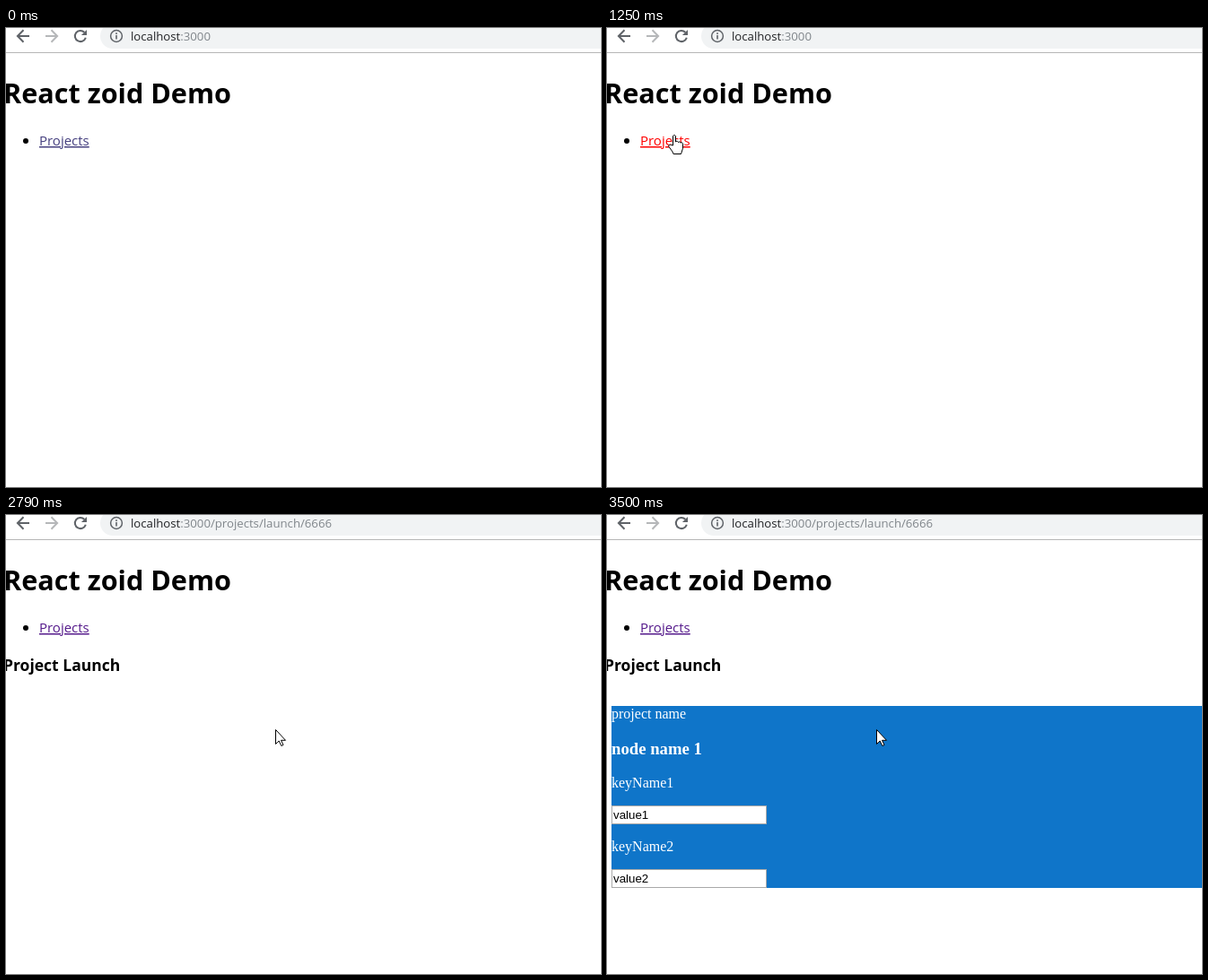
An HTML page that plays this animation: 663x512 px, repeating every 4220 ms.

```html
<!DOCTYPE html>
<html lang="en">
<head>
<meta charset="utf-8">
<title>React zoid Demo</title>
<style>
  html, body { margin: 0; width: 100%; height: 100%; overflow: hidden; background: #fff; }
  svg { display: block; width: 663px; height: 512px; font: 15px "Open Sans", "Noto Sans", sans-serif; }
  .link { fill: #551a8b; text-decoration: underline 1px; text-underline-offset: 1px; }
  .link.idle { fill: #46407f; }
  .link.active { fill: #f00; }
  .bold { font-weight: 700; }
  .url { font-size: 13.2px; fill: #202124; }
  #path { fill: #80868b; }
  .icon { fill: none; stroke: #5f6368; stroke-width: 2; }
  .serif { font: 16px "Liberation Serif", serif; fill: #fff; }
  .field rect { fill: #fff; stroke: #a9a9a9; }
  .field text { font: 13.333px "Liberation Sans", sans-serif; }
  .cursor { fill: #fff; stroke: #000; stroke-linejoin: round; }
</style>
</head>
<body>
<svg viewBox="0 0 663 512">
  <g id="toolbar">
    <rect x="105" y="-5" width="700" height="28" rx="14" fill="#f1f3f4"/>
    <path d="M0 27.5H663" stroke="#b6b6b6"/>
    <path class="icon" d="M26 9H13M19.5 2.3L12.9 9l6.6 6.7"/>
    <path class="icon" d="M44 9h13M50.5 2.3L57.1 9l-6.6 6.7" style="stroke:#b5b7b9"/>
    <path class="icon" d="M87.3 4.7A6.1 6.1 0 1 0 88.8 10.8"/>
    <path d="M90 2v6.1h-6.1z" fill="#5f6368"/>
    <circle class="icon" cx="123" cy="9" r="6.4" style="stroke-width:1.5"/>
    <path class="icon" d="M123 8v4.5M123 5.3v1.6" style="stroke-width:1.6"/>
    <text class="url" x="139" y="14">localhost<tspan id="path"></tspan></text>
  </g>

  <text class="bold" x="-3" y="84" font-size="30.6">React zoid Demo</text>
  <circle cx="22" cy="126" r="3"/>
  <text class="link" id="projects" x="37" y="131">Projects</text>

  <g id="table">
    <text x="0" y="171">No</text>
    <text x="39" y="171">Name</text>
    <text x="92" y="171">Operation</text>
    <text x="0" y="196">6666</text>
    <text x="39" y="196">Prject1</text>
    <text class="link" id="launch" x="92" y="196">Launch</text>
  </g>

  <g id="detail">
    <text class="bold" x="-3" y="174" font-size="17.5">Project Launch</text>
    <g id="panel">
      <rect x="5" y="213" width="658" height="203" fill="#0f75c9"/>
      <g class="serif">
        <text x="5" y="227">project name</text>
        <text class="bold" x="5" y="267" font-size="18.72">node name 1</text>
        <text x="5" y="304">keyName1</text>
        <text x="5" y="375">keyName2</text>
      </g>
      <g class="field">
        <rect x="5.5" y="324.5" width="172" height="20"/>
        <text x="7" y="339">value1</text>
        <rect x="5.5" y="395.5" width="172" height="20"/>
        <text x="7" y="410">value2</text>
      </g>
    </g>
  </g>

  <g id="pointer">
    <path class="cursor" id="arrow" d="M.5 .5v16l3.7-3.5 2.6 5.5 2.2-1-2.5-5.2h5z"/>
    <path class="cursor" id="hand" transform="translate(-5)"
      d="M5.5 12V2c0-2 3-2 3 0v6c0-1 3-1 3 .6 0-1 2.5-1 2.5 .6 0-1 2.5-.6 2.5 1v5l-2 6.300h-8.500l-1-2.500L1 13.500c-1-2 1-3 2.200-2z"/>
    <path class="cursor" id="beam" d="M-3-7.5H0M1-7.5H4M.5-7V8M-3 8.5H0M1 8.5H4" style="fill:none"/>
  </g>
</svg>
<script>
const LOOP = 4220;
const STEP = 230 / 3;
const $ = id => document.getElementById(id);
const show = (id, on) => { $(id).style.display = on ? "" : "none"; };

// Pointer moves in straight, evenly stepped strokes.
const origin = { x: 588, y: 555 };
const strokes = [
  { start: 180, end: 640, x: 146, y: 159 },
  { start: 710, end: 780, x: 89, y: 108 },
  { start: 860, end: 1090, x: 73, y: 119 },
  { start: 1550, end: 1860, x: 97, y: 169 },
  { start: 1940, end: 2010, x: 107, y: 198 },
  { start: 2100, end: 2560, x: 118, y: 187 },
  { start: 2640, end: 2790, x: 300, y: 239 }
];
const paths = [":3000", ":3000/projects/", ":3000/projects/launch/6666"];

function pointerAt(t) {
  const i = strokes.findLastIndex(s => t >= s.start);
  if (i < 0) return null;
  const from = strokes[i - 1] || origin, to = strokes[i];
  const steps = Math.round((to.end - to.start) / STEP) + 1;
  const done = t >= to.end ? 1 : (Math.floor((t - to.start) / STEP + 0.1) + 1) / steps;
  return [from.x + (to.x - from.x) * done, from.y + (to.y - from.y) * done].map(Math.round);
}

function pointerKind([x, y], page) {
  const inside = (l, t, r, b) => x >= l && x <= r && y >= t && y <= b;
  if (inside(37, 115, 93, 136)) return "hand";
  if (page === 1 && inside(92, 181, 142, 202)) return "hand";
  if (page === 1 && inside(92, 157, 163, 179)) return "beam";
  return "arrow";
}

function draw(t) {
  const page = t < 1400 ? 0 : t < 2400 ? 1 : 2;
  $("path").textContent = paths[page];
  show("table", page === 1);
  show("detail", page === 2);
  $("projects").classList.toggle("idle", t < 1250);
  $("projects").classList.toggle("active", t >= 1250 && page === 0);
  $("launch").classList.toggle("active", t >= 2250);
  $("panel").setAttribute("opacity", t < 3340 ? 0 : t < 3430 ? 0.13 : t < 3500 ? 0.64 : 1);

  const pos = pointerAt(t);
  show("pointer", pos);
  if (!pos) return;
  $("pointer").setAttribute("transform", `translate(${pos})`);
  const kind = pointerKind(pos, page);
  for (const id of ["arrow", "hand", "beam"]) show(id, id === kind);
}

const begin = performance.now();
function tick() {
  draw((performance.now() - begin) % LOOP);
  requestAnimationFrame(tick);
}
tick();
</script>
</body>
</html>
```
